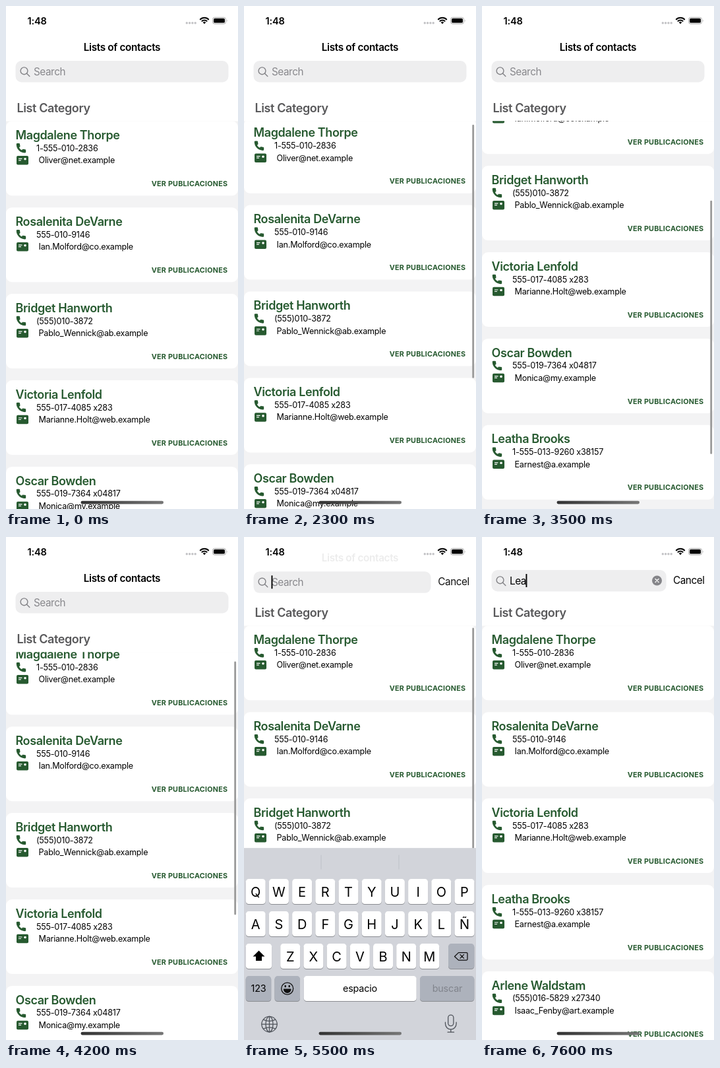
Write an HTML page that moves like this. It is 352 px wide and 762 px high and loops after 8 s.

```html
<!DOCTYPE html>
<html lang="en">
<head>
<meta charset="utf-8">
<title>Lists of contacts</title>
<style>
  html, body { margin: 0; width: 100%; height: 100%; overflow: hidden; background: #fff; }
  #stage { display: block; width: 100vw; height: 100vh; }
  text { font-family: Inter, Roboto, sans-serif; white-space: pre; }
  .body { font-size: 15.3px; letter-spacing: -.45px; }
  .clock { font-size: 14.6px; font-weight: 600; letter-spacing: -.2px; }
  .title { font-weight: 600; letter-spacing: -.34px; }
  .label, .name { font-size: 18px; font-weight: 600; letter-spacing: -.4px; }
  .label { fill: #58585a; }
  .name, .link, .icon { fill: #275a30; }
  .detail { font-size: 12.6px; letter-spacing: -.22px; }
  .link { font-size: 10.8px; font-weight: 700; letter-spacing: .2px; text-anchor: end; }
  .letter { font-size: 20px; text-anchor: middle; }
  .small { font-size: 14.4px; letter-spacing: -.2px; text-anchor: middle; }
  .middle { text-anchor: middle; }
  .line { fill: none; stroke-linecap: round; stroke-linejoin: round; }
</style>
</head>
<body>
<svg id="stage" viewBox="0 0 352 762">
  <defs>
    <path id="call" class="icon" transform="translate(14.2 32.2) scale(.73)"
      stroke="#275a30" stroke-width="1.8" stroke-linejoin="round"
      d="M6.6 10.8c1.4 2.8 3.8 5.1 6.6 6.6l2.2-2.2c.3-.3.7-.4 1-.2 1.1.4 2.3.6 3.6.6.6 0 1 .4 1 1V20c0 .6-.4 1-1 1C10.6 21 3 13.4 3 4c0-.6.4-1 1-1h3.5c.6 0 1 .4 1 1 0 1.2.2 2.4.6 3.6.1.4 0 .7-.3 1z"/>
    <g id="mail">
      <rect class="icon" x="16" y="52.8" width="18" height="13.5" rx="2"/>
      <path class="line" stroke="#fff" stroke-width="1.2" d="M19.5 57h4.5M19.5 59.5h3"/>
      <circle cx="29" cy="57.5" r="1.8" fill="#fff"/>
    </g>
    <linearGradient id="homeShade">
      <stop stop-color="#333"/><stop offset="1" stop-color="#777"/>
    </linearGradient>
  </defs>
  <rect width="352" height="762" fill="#fff"/>

  <svg id="list" width="352" height="640">
    <rect width="352" height="640" fill="#f3f3f4"/>
    <g id="cards"></g>
    <rect id="bar" x="346.3" width="2.8" height="384" rx="1.4" fill="#999"/>
  </svg>

  <text id="title" class="body title middle" x="176" y="67.5">Lists of contacts</text>
  <g id="search">
    <rect id="field" x="14.5" width="323" height="32.5" rx="9"/>
    <g class="line" stroke="#828286" stroke-width="1.4">
      <circle cx="27.5" cy="15.3" r="5.4"/><path d="M31.5 19.3l4.3 4.2"/>
    </g>
    <text id="hint" class="body" x="42" y="22.2">Search</text>
    <text id="query" class="body" x="42" y="22.2"></text>
    <rect id="cursor" y="6" width="1.9" height="20"/>
    <g id="clear">
      <circle cx="265.5" cy="16" r="7.5" fill="#858589"/>
      <path class="line" stroke="#fff" stroke-width="1.3" d="M263 13.5l5 5m0-5l-5 5"/>
    </g>
    <text id="cancel" class="body" y="21">Cancel</text>
  </g>
  <text id="label" class="label" x="16.5">List Category</text>

  <text class="clock" x="32.5" y="27.5">1:48</text>
  <g fill="#c3c3c6">
    <circle cx="274.3" cy="25.7" r="1.7"/><circle cx="278.6" cy="25.7" r="1.7"/>
    <circle cx="282.9" cy="25.7" r="1.7"/><circle cx="287.2" cy="25.7" r="1.7"/>
  </g>
  <path d="M294.3 20.8a9 9 0 0 1 13.4 0M296.8 23.4a5.8 5.8 0 0 1 8.4 0" fill="none" stroke="#000" stroke-width="2"/>
  <path d="M301 27.3l-2.3-2.5a3.3 3.3 0 0 1 4.6 0z"/>
  <rect x="313.5" y="17.3" width="20" height="9.8" rx="3" fill="none" stroke="#aaa"/>
  <rect x="315" y="18.8" width="17" height="6.8" rx="1.7"/>
  <path d="M335 20.5q1.6 1.7 0 3.5z" fill="#aaa"/>

  <g id="keyboard"></g>
  <rect x="113.5" y="749.8" width="125.5" height="4.6" rx="2.3" fill="url(#homeShade)"/>
</svg>
<script>
const $ = id => document.getElementById(id);
const set = (id, attrs) => {
  for (const key in attrs) $(id).setAttribute(key, attrs[key]);
};

const contacts = [
  ['Magdalene Thorpe', '1-555-010-2836', 'Oliver@net.example'],
  ['Rosalenita DeVarne', '555-010-9146', 'Ian.Molford@co.example'],
  ['Bridget Hanworth', '(555)010-3872', 'Pablo_Wennick@ab.example'],
  ['Victoria Lenfold', '555-017-4085 x283', 'Marianne.Holt@web.example'],
  ['Oscar Bowden', '555-019-7364 x04817', 'Monica@my.example'],
  ['Leatha Brooks', '1-555-013-9260 x38157', 'Earnest@a.example'],
  ['Mrs. Martin Holbrack', '1-555-018-2473 x9052', 'Bethan_Rusk@hub.example'],
  ['Arlene Waldstam', '(555)016-5829 x27340', 'Isaac_Fenby@art.example'],
];

$('cards').innerHTML = contacts.map(([name, phone, email]) => `<g>
  <rect width="352" height="113" rx="9" fill="#fff"/>
  <text class="name" x="14.5" y="27.7">${name}</text>
  <use href="#call"/><text class="detail" x="46" y="45.5">${phone}</text>
  <use href="#mail"/><text class="detail" x="49.5" y="64">${email}</text>
  <text class="link" x="336.2" y="98.7">VER PUBLICACIONES</text></g>`).join('');

// Keyboard, laid out from its own top edge.
const key = (x, y, width, fill = '#fff') =>
  `<rect x="${x}" y="${y + 1}" width="${width}" height="38" rx="4.5" fill="#8b8d92"/>
   <rect x="${x}" y="${y}" width="${width}" height="38" rx="4.5" fill="${fill}"/>`;
const keyRow = (letters, left, y) => [...letters].map((letter, i) => {
  const x = left + i * 35.2;
  return key(x, y, 30) + `<text class="letter" x="${x + 15}" y="${y + 26.5}">${letter}</text>`;
}).join('');
const gray = '#adb2bc';

$('keyboard').innerHTML = `<rect width="352" height="310" fill="#d2d4da"/>
  <path class="line" stroke="#bec1c8" d="M117 11v21M235 11v21"/>`
  + keyRow('QWERTYUIOP', 2.7, 47) + keyRow('ASDFGHJKLÑ', 2.7, 96) + keyRow('ZXCVBNM', 55.2, 145)
  + key(2.7, 145, 39.5) + key(310, 145, 39.3, gray)
  + key(2.7, 194, 38.5, gray) + key(46.5, 194, 38.5, gray) + key(90.7, 194, 171) + key(267, 194, 82.3, gray)
  + `<path d="M22.5 155.5l9 9h-4.5v6.5h-9v-6.5h-4.5z"/>
  <g class="line" stroke="#111" stroke-width="1.3">
    <path d="M325.5 158.5h12q1.5 0 1.5 1.5v8.5q0 1.5-1.5 1.5h-12l-6-5.7zM328 161.5l5.5 5.5m0-5.5l-5.5 5.5"/>
    <circle cx="65.7" cy="213" r="9"/>
    <path d="M60.5 214h10.4a5.2 5.2 0 0 1-10.4 0z" fill="#111"/>
  </g>
  <ellipse cx="62.7" cy="209.5" rx="1.2" ry="1.8"/><ellipse cx="68.7" cy="209.5" rx="1.2" ry="1.8"/>
  <text class="small" x="22" y="218">123</text>
  <text class="small" x="176" y="217.5">espacio</text>
  <text class="small" x="308.5" y="217.5" fill="#80848c">buscar</text>
  <g class="line" stroke="#50545b" stroke-width="1.3">
    <circle cx="38.5" cy="267" r="11.7"/><ellipse cx="38.5" cy="267" rx="5.5" ry="11.7"/>
    <path d="M38.5 255.3v23.4M26.8 267h23.4M29.5 260q9 4.5 18 0M29.5 274q9-4.5 18 0"/>
    <rect x="309.7" y="253" width="8.2" height="16.5" rx="4.1"/>
    <path d="M305.5 264v2.5a8.3 8.3 0 0 0 16.6 0V264M313.8 275v4M309 279h9.6"/>
  </g>`;

// Linear interpolation through [time, value] points.
function track(t, points) {
  let [t0, v0] = points[0];
  for (const [t1, v1] of points) {
    if (t < t1) return t <= t0 ? v0 : v0 + (v1 - v0) * (t - t0) / (t1 - t0);
    [t0, v0] = [t1, v1];
  }
  return v0;
}

const maxScroll = 393;
const scrollPath = [
  [2200, 0], [2300, 3.6], [2400, 55], [2500, 175], [2600, 300], [2700, 385], [2800, 419.3],
  [2900, 406], [3000, 396], [3100, maxScroll], [3200, 375], [3300, 315], [3400, 245], [3500, 194],
  [3600, 175], [3800, 175], [3900, 160], [4000, 105], [4100, 50], [4200, 18], [4300, 4], [4400, 0],
];
const keyboardPath = [
  [5100, 0], [5200, .32], [5300, .68], [5400, .88], [5500, .96], [5700, 1],
  [6300, 1], [6400, .92], [6500, .55], [6600, .24], [6700, .08], [6900, 0],
];
const headerPath = [[5200, 0], [5300, .4], [5400, .76], [5500, .93], [5700, 1]];
const barPath = [
  [2200, 0], [2300, 1], [4200, 1], [4400, 0], [5100, 0], [5200, 1], [5600, 1], [5900, 0],
];
const cursorPath = [[5100, 0], [5200, 1], [5600, 1], [5800, 0], [6000, 0], [6200, 1]];

function draw(t) {
  const focused = t >= 5200;
  const header = track(t, headerPath);
  const scroll = track(t, scrollPath);
  const listTop = focused ? 134.3 : 174.3;
  const typed = 'Lea'.slice(0, (t >= 6400) + (t >= 7200) + (t >= 7400));
  const filter = t >= 7500 ? 'le' : '';

  set('list', { y: listTop });
  set('label', { y: listTop - 13.3 });
  let row = 0;
  [...$('cards').children].forEach((card, i) => {
    const shown = contacts[i][0].toLowerCase().includes(filter);
    card.setAttribute('display', shown ? 'inline' : 'none');
    if (shown) card.setAttribute('transform', `translate(0 ${row++ * 130.9 - scroll})`);
  });
  set('bar', {
    y: 3.2 + .605 * Math.min(scroll, maxScroll) + Math.max(0, scroll - maxScroll),
    opacity: track(t, barPath),
  });

  set('title', { opacity: 1 - header, transform: `translate(0 ${-33 * header})` });
  set('search', { transform: `translate(0 ${83 - 33 * header})` });
  const pressed = focused && t < 5400;
  set('field', { width: 323 - 58 * header, fill: pressed ? '#e2e2e4' : '#eeeeef' });
  set('hint', { fill: pressed ? '#a2a2a6' : '#88888c', display: typed ? 'none' : 'inline' });
  $('query').textContent = typed;
  const caret = typed ? $('query').getComputedTextLength() : 0;
  set('cursor', { x: 41.5 + caret, opacity: track(t, cursorPath) });
  set('clear', { display: typed ? 'inline' : 'none' });
  set('cancel', { x: 290 + 62 * (1 - header), opacity: header });

  set('keyboard', { transform: `translate(0 ${762 - 303 * track(t, keyboardPath)})` });
}

// The picture advances in steps of 100 ms.
function tick() {
  draw(Math.floor(performance.now() % 8000 / 100) * 100);
  requestAnimationFrame(tick);
}
tick();
</script>
</body>
</html>
```
